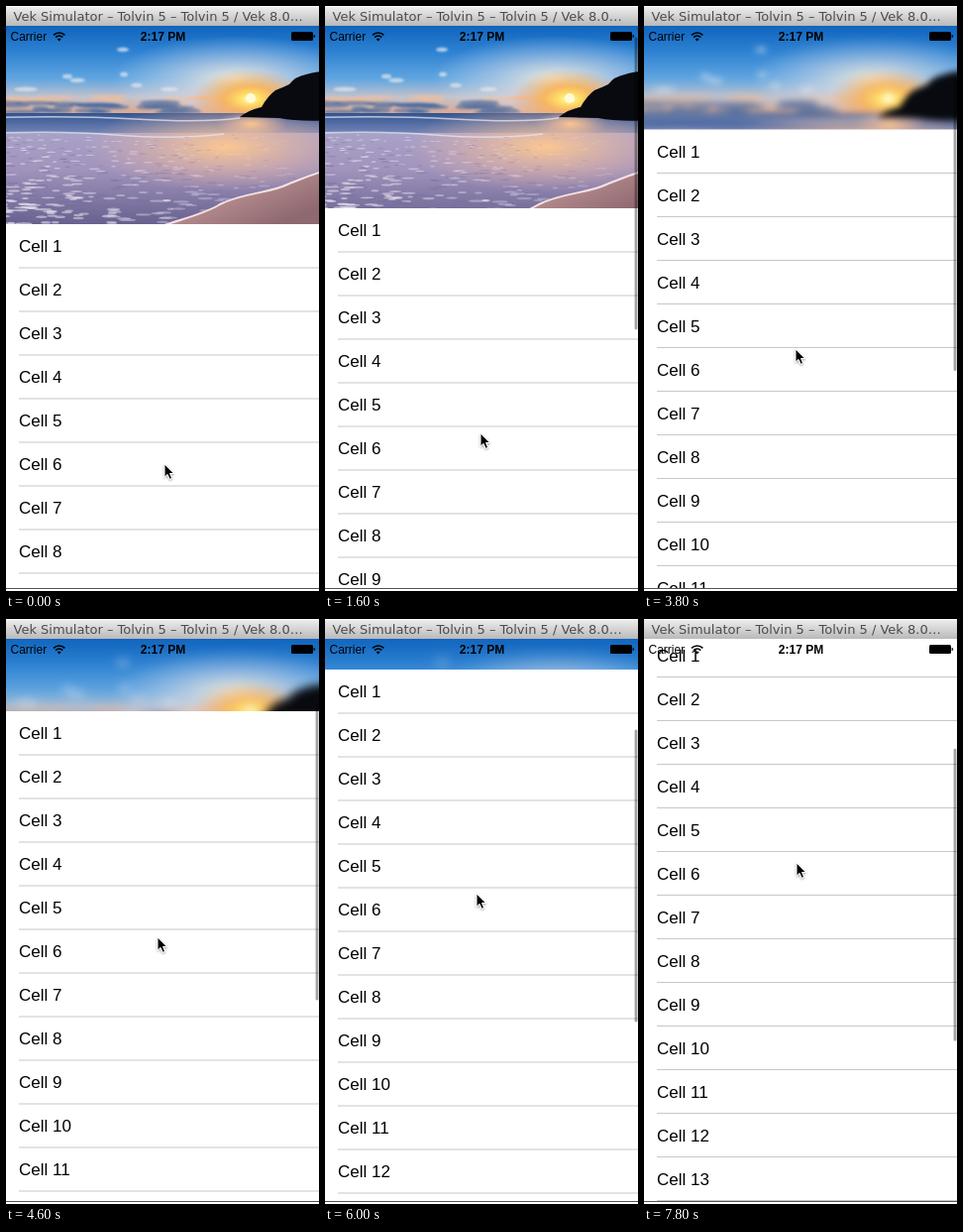
An HTML page for the animation above (8000 ms loop, 316 px wide and 590 px high).

```html
<!DOCTYPE html>
<html lang="en">
<head>
<meta charset="utf-8">
<title>Blurring header</title>
<style>
  html, body { margin: 0; width: 100%; height: 100%; overflow: hidden; background: #fff; }
  svg { display: block; width: 100vw; height: 100vh; }
  text { font-family: "Liberation Sans", Arial, sans-serif; fill: #000; }
  .title { font: 13px "DejaVu Sans", sans-serif; fill: #4c4c4c; }
  .status { font-size: 12px; }
  .cell { font-size: 17px; }
</style>
</head>
<body>
<svg viewBox="0 0 316 590">
  <defs>
    <linearGradient id="bar" x2="0" y2="1">
      <stop stop-color="#ececec"/><stop offset="1" stop-color="#b9b9b9"/>
    </linearGradient>
    <linearGradient id="sky" gradientUnits="userSpaceOnUse" x1="0" y1="20" x2="0" y2="110">
      <stop stop-color="#0f64bd"/><stop offset=".3" stop-color="#2f83d3"/>
      <stop offset=".6" stop-color="#62a6e0"/><stop offset=".8" stop-color="#c3c3cc"/>
      <stop offset="1" stop-color="#e0a68c"/>
    </linearGradient>
    <linearGradient id="sea" gradientUnits="userSpaceOnUse" x1="0" y1="108" x2="0" y2="132">
      <stop stop-color="#31548f"/><stop offset="1" stop-color="#7f8dbd"/>
    </linearGradient>
    <linearGradient id="surf" gradientUnits="userSpaceOnUse" x1="0" y1="126" x2="0" y2="220">
      <stop stop-color="#a9a3c8"/><stop offset=".4" stop-color="#a294bd"/>
      <stop offset="1" stop-color="#67618f"/>
    </linearGradient>
    <linearGradient id="sand" gradientUnits="userSpaceOnUse" x1="250" y1="175" x2="270" y2="222">
      <stop stop-color="#b98f90"/><stop offset="1" stop-color="#8e6970"/>
    </linearGradient>
    <radialGradient id="haze">
      <stop stop-color="#fff3d8" stop-opacity=".9"/><stop offset=".5" stop-color="#e9e4e8" stop-opacity=".45"/>
      <stop offset="1" stop-color="#d5e4f4" stop-opacity="0"/>
    </radialGradient>
    <radialGradient id="glow">
      <stop stop-color="#fffbd0"/><stop offset=".16" stop-color="#ffe36a"/>
      <stop offset=".45" stop-color="#ffad3e" stop-opacity=".75"/><stop offset="1" stop-color="#f59a50" stop-opacity="0"/>
    </radialGradient>
    <radialGradient id="shine">
      <stop stop-color="#ffc98e" stop-opacity=".95"/><stop offset="1" stop-color="#eeb4a4" stop-opacity="0"/>
    </radialGradient>
    <filter id="blur" filterUnits="userSpaceOnUse" x="-30" y="-10" width="376" height="260" color-interpolation-filters="sRGB">
      <feGaussianBlur id="soft" stdDeviation="0"/>
    </filter>
    <filter id="puff" filterUnits="userSpaceOnUse" x="-40" y="-20" width="396" height="280" color-interpolation-filters="sRGB">
      <feGaussianBlur stdDeviation="1.3"/>
    </filter>
    <filter id="drop" x="-50%" y="-50%" width="200%" height="200%">
      <feDropShadow dx="0" dy="1" stdDeviation="1" flood-opacity=".4"/>
    </filter>
    <clipPath id="photo"><rect id="window" y="20" width="316" height="200"/></clipPath>
    <clipPath id="screen"><rect y="20" width="316" height="567"/></clipPath>
  </defs>
  <rect width="316" height="590" fill="#fff"/>

  <g clip-path="url(#photo)">
    <g id="beach" filter="url(#blur)">
      <rect x="-30" y="-20" width="376" height="132" fill="url(#sky)"/>
      <ellipse cx="232" cy="74" rx="125" ry="44" fill="url(#haze)"/>
      <g id="clouds" filter="url(#puff)"></g>
      <ellipse cx="246" cy="94" rx="58" ry="30" fill="url(#glow)"/>
      <circle cx="247" cy="93" r="5" fill="#fffbd8"/>
      <rect x="-30" y="108" width="376" height="26" fill="url(#sea)"/>
      <rect x="-30" y="128" width="376" height="120" fill="url(#surf)"/>
      <ellipse cx="222" cy="142" rx="140" ry="46" fill="url(#shine)"/>
      <ellipse cx="248" cy="119" rx="36" ry="14" fill="url(#shine)"/>
      <path d="M-30 113Q60 110 130 114T236 113M-30 129Q50 125 110 130T220 129" fill="none" stroke="#e4e6f4" stroke-width="1.6" stroke-opacity=".75"/>
      <g id="foam"></g>
      <path d="M160 240V220C184 213 202 209 216 200C240 188 266 189 284 180C300 174 316 166 346 160V240Z" fill="url(#sand)"/>
      <path d="M160 221C184 213 202 209 216 200C240 188 266 189 284 180C300 174 316 166 346 160" fill="none" stroke="#f3e2e4" stroke-width="2"/>
      <path d="M236 112Q246 104 258 102Q264 91 272 85Q280 82 286 79Q292 71 303 69Q316 64 346 66V114Q300 118 276 113Z" fill="#080a10"/>
    </g>
  </g>

  <g clip-path="url(#screen)"><g id="list"></g></g>

  <g id="status">
    <text class="status" x="4.5" y="35">Carrier</text>
    <g fill="none" stroke="#000" stroke-width="1.7">
      <path d="M48 29.3a8.2 8.2 0 0 1 11.4 0M50.2 31.6a5 5 0 0 1 7 0"/>
      <path d="M53.7 35.6l-1.9-2.2a2.8 2.8 0 0 1 3.8 0z" fill="#000" stroke="none"/>
    </g>
    <text class="status" x="158.5" y="35" text-anchor="middle" font-weight="bold">2:17 PM</text>
    <rect x="288" y="26" width="22" height="9" rx="1.5"/>
    <path d="M311 29q1.6 1.5 0 3z" stroke="#000" stroke-width=".6"/>
  </g>
  <rect id="thumb" x="312.6" width="2.8" height="295" rx="1.4" fill="#000" fill-opacity=".36"/>

  <rect y="1" width="316" height="19" fill="url(#bar)"/>
  <text class="title" x="7.5" y="14.5">Vek Simulator – Tolvin 5 – Tolvin 5 / Vek 8.0…</text>
  <rect y="587" width="316" height="1" fill="#555"/>
  <path id="cursor" d="M0 0V13.2L3 10.4L5.2 15.3L7.6 14.3L5.5 9.5H9.6Z" stroke="#fff" stroke-width="1" filter="url(#drop)"/>
</svg>
<script>
const $ = id => document.getElementById(id);
const LOOP = 8000, STEP = 200, ROW = 44, TOP = 220;

// [time, scroll, cursor x, cursor y]
const keys = [
  [0, 0, 160, 462], [600, 0, 160, 462], [1200, 0, 158.5, 447], [1400, 7, 158, 439],
  [1600, 16, 157, 431], [2600, 50, 155, 398], [3800, 95.5, 153, 346],
  [4600, 127, 153, 321], [6000, 169, 153, 277], [7800, 205.5, 154, 246]
];

// Monotone cubic through one column of the keys
function track(t, col) {
  const last = keys.length - 1;
  if (t >= keys[last][0]) return keys[last][col];
  const slope = i => (keys[i + 1][col] - keys[i][col]) / (keys[i + 1][0] - keys[i][0]);
  const tangent = i => {
    const a = slope(Math.max(i - 1, 0)), b = slope(Math.min(i, last - 1));
    return a * b > 0 ? 2 * a * b / (a + b) : 0;
  };
  const i = keys.findIndex(k => k[0] > t) - 1;
  const h = keys[i + 1][0] - keys[i][0], u = (t - keys[i][0]) / h, v = 1 - u;
  return v * v * (1 + 2 * u) * keys[i][col] + u * u * (3 - 2 * u) * keys[i + 1][col]
    + h * u * v * (v * tangent(i) - u * tangent(i + 1));
}

let seed = 11;
const rand = () => (seed = (seed * 16807) % 2147483647) / 2147483647;
const blob = (x, y, rx, ry, fill, alpha) =>
  `<ellipse cx="${x.toFixed(1)}" cy="${y.toFixed(1)}" rx="${rx.toFixed(1)}" ry="${ry.toFixed(1)}" fill="${fill}" opacity="${alpha.toFixed(2)}"/>`;

function drawClouds() {
  let out = '';
  for (const [x, y, r] of [[118, 44, 6], [119, 69, 4], [132, 80, 6], [72, 75, 8], [62, 71, 5], [20, 84, 12], [165, 84, 9]])
    out += blob(x, y, r, 2.2, '#dfe6f2', .75);
  for (let i = 0; i < 16; i++)
    out += blob(rand() * 215 - 10, 90 + rand() * 9, 9 + rand() * 16, 2, '#f3bd98', .5);
  for (let i = 0; i < 26; i++)
    out += blob(rand() * 195 - 15, 97 + rand() * 10, 8 + rand() * 18, 2.2, '#496a9f', .6);
  return out;
}

function drawFoam() {
  let out = '';
  for (let i = 0; i < 420; i++) {
    const d = rand(), x = rand() ** 1.35 * 300 - 10, y = 130 + d * 92;
    const size = .8 + d * 1.6;
    const pale = rand() < .66;
    out += blob(x, y, size * (1.5 + rand() * 3), size * .55, pale ? '#ece6f2' : '#716e9e', (pale ? .6 : .42) * (1 - x / 420));
  }
  return out;
}

function drawRows() {
  let out = '';
  for (let i = 0; i < 14; i++) {
    const y = i * ROW;
    out += `<text class="cell" x="13" y="${y + 28}">Cell ${i + 1}</text>`
      + `<rect x="13" y="${y + 43.5}" width="303" height="1" fill="#c8c8c8"/>`;
  }
  return out;
}

$('clouds').innerHTML = drawClouds();
$('foam').innerHTML = drawFoam();
$('list').innerHTML = drawRows();

function render(t) {
  const scroll = Math.round(track(t, 1) * 2) / 2;
  $('list').setAttribute('transform', `translate(0 ${TOP - scroll})`);
  $('window').setAttribute('height', Math.max(0, TOP - 20 - scroll));
  $('soft').setAttribute('stdDeviation', scroll * .036);
  $('thumb').setAttribute('y', 23 + scroll * .524);
  $('thumb').setAttribute('visibility', scroll > 0 ? 'visible' : 'hidden');
  $('cursor').setAttribute('transform', `translate(${track(t, 2)} ${track(t, 3)})`);
}

const start = performance.now();
let shown = -1;
function tick() {
  const t = Math.floor((performance.now() - start) % LOOP / STEP) * STEP;
  if (t !== shown) render(shown = t);
  requestAnimationFrame(tick);
}
tick();
</script>
</body>
</html>
```
